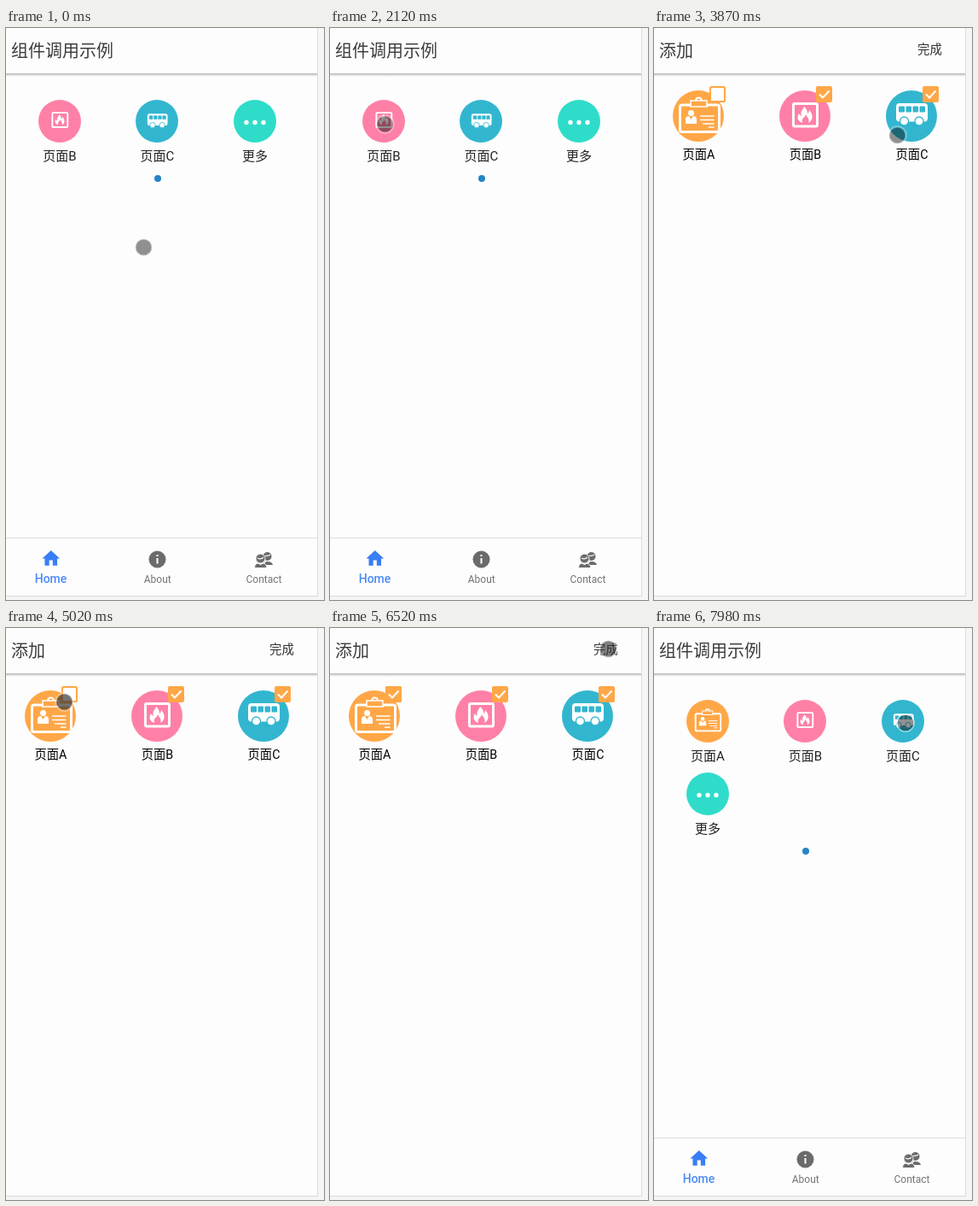
An HTML page for the animation above (8000 ms loop, 373 by 669 pixels).

```html
<!DOCTYPE html>
<html lang="zh-CN">
<head>
<meta charset="utf-8">
<title>组件调用示例</title>
<style>
html, body { margin: 0; width: 100%; height: 100%; overflow: hidden; background: #f5f5f5; }
svg { display: block; width: 373px; height: 669px; }
text { font-family: Roboto, "Noto Sans CJK SC", "Noto Sans CJK", sans-serif; }
.title { font-size: 20px; font-weight: 300; fill: #3c3c3c; }
.done { font-size: 14.4px; fill: #333; }
.label { font-size: 15px; text-anchor: middle; fill: #222; }
.small { font-size: 14.3px; text-anchor: middle; fill: #000; }
.tab { font-size: 12px; text-anchor: middle; fill: #757575; }
.active { font-size: 14px; font-weight: 500; fill: #4a8af8; }

.anim { animation: 8s step-end infinite; }
#before { animation-name: before; }
#after { animation-name: after; }
#add { animation-name: add; }
#tick { animation-name: tick; }
#cursor { animation-name: move; }
#spot { fill: rgba(0, 0, 0, .43); animation-name: press; }

@keyframes before { 0% { visibility: visible } 86.5%, 100% { visibility: hidden } }
@keyframes after { 0% { visibility: hidden } 86.5%, 100% { visibility: visible } }
@keyframes add {
  0% { opacity: 0 }
  46.5% { opacity: .75; transform: translateY(4px) }
  48.375% { opacity: 1; transform: none }
  86.5% { opacity: .7; transform: translateY(6px) }
  88.375%, 100% { opacity: 0; transform: none }
}
@keyframes tick { 0% { visibility: hidden } 66.5%, 100% { visibility: visible } }
@keyframes press {
  0% { fill: rgba(0, 0, 0, .43) }
  62.75% { fill: rgba(50, 50, 50, .68) }
  66.5% { fill: rgba(0, 0, 0, .43) }
  81.5% { fill: rgba(50, 50, 50, .62) }
  88.375%, 100% { fill: rgba(0, 0, 0, .43) }
}
@keyframes move {
  0% { transform: translate(161.5px, 256.5px) }
  5% { transform: translate(159px, 262px) }
  6.5% { transform: translate(156.5px, 266.5px) }
  11.875% { transform: translate(151px, 262px) }
  13.375% { transform: translate(143px, 254px) }
  14.875% { transform: translate(133.5px, 245.5px) }
  16.75% { transform: translate(129.5px, 218.5px) }
  18.625% { transform: translate(119.5px, 191.5px) }
  20.125% { transform: translate(98px, 160px) }
  21.625% { transform: translate(70px, 130px) }
  23.125% { transform: translate(46px, 112px) }
  24.625% { transform: translate(47.5px, 108.5px) }
  26.5% { transform: translate(64.5px, 112.5px) }
  35.125% { transform: translate(216.5px, 140.5px) }
  37% { transform: translate(245px, 139px) }
  38.5% { transform: translate(270px, 132px) }
  40% { transform: translate(285.5px, 125.5px) }
  54.5% { transform: translate(285px, 131px) }
  56% { transform: translate(284.5px, 135px) }
  57.875% { transform: translate(215px, 122px) }
  59.375% { transform: translate(120px, 98px) }
  60.875% { transform: translate(68.5px, 86.5px) }
  69.875% { transform: translate(170px, 73px) }
  71.375% { transform: translate(290.5px, 57.5px) }
  73.25% { transform: translate(318px, 38px) }
  74.75% { transform: translate(338.5px, 24.5px) }
  76.625% { transform: translate(354px, 20px) }
  78.125% { transform: translate(362px, 19px) }
  79.625% { transform: translate(338.5px, 23.5px) }
  81.5% { transform: translate(326.5px, 24.5px) }
  89.875% { transform: translate(322px, 38px) }
  91.375% { transform: translate(316.5px, 52.5px) }
  94.875% { transform: translate(314.5px, 59.5px) }
  96.75% { transform: translate(309px, 78px) }
  98.25% { transform: translate(301px, 98px) }
  99.75%, 100% { transform: translate(295px, 111px) }
}
</style>
</head>
<body>
<svg viewBox="0 0 373 669">
  <defs>
    <linearGradient id="shade" x2="0" y2="1">
      <stop offset="0" stop-color="#b4b4b4"/>
      <stop offset=".4" stop-color="#d6d6d6"/>
      <stop offset="1" stop-color="#fdfdfd"/>
    </linearGradient>

    <g id="bar">
      <rect width="365" height="664" fill="#fdfdfd"/>
      <rect y="53" width="365" height="4" fill="url(#shade)"/>
    </g>

    <!-- Badges have a radius of 30 around their own centre. -->
    <g id="card">
      <circle r="30" fill="#ffa747"/>
      <g fill="none" stroke="#fff">
        <rect x="-21.5" y="-13" width="46" height="31.5" rx="2.5" stroke-width="3"/>
        <path d="M2 0H18.500M2 4.500H18.500M5 9H18.500M12 13H18.500" stroke-width="1.500"/>
        <path d="M-3 -18a3.500 3.500 0 0 1 7 0" stroke-width="2"/>
        <rect x="-9" y="-18" width="19" height="7" fill="#ffa747" stroke-width="1.500"/>
      </g>
      <g fill="#fff">
        <circle cx="-8.500" cy="-3.500" r="3.500"/>
        <path d="M-15 9V4q0-4 4-4l2.500 4 2.500-4q4 0 4 4v5z"/>
      </g>
    </g>

    <g id="fire">
      <circle r="30" fill="#ff80a6"/>
      <rect x="-13.500" y="-14.500" width="28" height="26.500" rx="1.500" fill="none" stroke="#fff" stroke-width="3"/>
      <path d="M-3 8C-8 6-10 2-7-3q1 3 3 3C-6-5-2-8-1-11 2-9 3-6 3-3q2-1 2-4C10-2 10 5 4 8 6 4 3 2 1-2 1 1-5 3-3 8z" fill="#fff"/>
    </g>

    <g id="bus">
      <circle r="30" fill="#32b6cf"/>
      <rect x="-18" y="-15" width="37" height="21.500" rx="4" fill="#fff"/>
      <path d="M-14.500-11h6v6h-6zM-6-11h5.500v6H-6zM2-11h5.500v6H2zM10-11h5.500v6H10z" fill="#32b6cf" stroke="#32b6cf" stroke-linejoin="round"/>
      <g fill="#fff" stroke="#32b6cf" stroke-width="1.300">
        <circle cx="-8.500" cy="6" r="5"/>
        <circle cx="9" cy="6" r="5"/>
      </g>
    </g>

    <g id="more">
      <circle r="25" fill="#2edcc9"/>
      <g fill="#fff">
        <circle cx="-10" cy="1.500" r="2.700"/>
        <circle cy="1.500" r="2.700"/>
        <circle cx="10" cy="1.500" r="2.700"/>
      </g>
    </g>

    <!-- Small badges keep the circle at 25 and shrink the drawing. -->
    <g id="cardS"><circle r="25" fill="#ffa747"/><use href="#card" transform="translate(-.5 -.5) scale(.64)"/></g>
    <g id="fireS"><circle r="25" fill="#ff80a6"/><use href="#fire" transform="translate(0 -.6) scale(.64)"/></g>
    <g id="busS"><circle r="25" fill="#32b6cf"/><use href="#bus" transform="translate(.4 .8) scale(.64)"/></g>

    <g id="checked">
      <rect width="19" height="19" rx="2" fill="#ffa747"/>
      <path d="M4 9.500L8 13.500L15.500 5.500" fill="none" stroke="#fff" stroke-width="2"/>
    </g>

    <g id="home">
      <use href="#bar"/>
      <text class="title" x="6" y="33.500">组件调用示例</text>
      <path d="M0 596.500H365" stroke="#dedede"/>
      <path d="M10 20v-6h4v6h5v-8h3L12 3 2 12h3v8z" transform="translate(40.300 608) scale(1.040)" fill="#387ef5"/>
      <text class="tab active" x="52.500" y="649">Home</text>
      <circle cx="177.500" cy="621.500" r="10" fill="#6b6b6b"/>
      <path d="M176.500 616h2v2h-2zM176.500 620h2v6.500h-2z" fill="#fff"/>
      <text class="tab" x="177.700" y="649">About</text>
      <g fill="#6b6b6b">
        <circle cx="306.500" cy="618" r="5"/>
        <path d="M303 628q0-4 4-4 5 0 6 4z"/>
        <g stroke="#fdfdfd">
          <circle cx="298.500" cy="620.500" r="5.500"/>
          <path d="M291.500 631.500q0-5 4-5.500l3 1.500 3-1.500q4 .5 4.500 5.500z"/>
        </g>
        <path d="M295 620q4 2 7-1M304 617q3 1 6-1" fill="none" stroke="#fdfdfd" stroke-width="1.200"/>
      </g>
      <text class="tab" x="302.500" y="649">Contact</text>
    </g>
  </defs>

  <rect width="373" height="669" fill="#f5f5f5"/>

  <g id="before" class="anim">
    <use href="#home"/>
    <use href="#fireS" x="63" y="109"/>
    <use href="#busS" x="177" y="109"/>
    <use href="#more" x="292" y="109"/>
    <text class="label" x="63" y="154.500">页面B</text>
    <text class="label" x="177.500" y="154.500">页面C</text>
    <text class="label" x="292" y="154.500">更多</text>
    <circle cx="178" cy="176" r="4" fill="#2484c6"/>
  </g>

  <g id="after" class="anim">
    <use href="#home"/>
    <use href="#cardS" x="63" y="109"/>
    <use href="#fireS" x="177" y="109"/>
    <use href="#busS" x="292" y="109"/>
    <use href="#more" x="63" y="194"/>
    <text class="label" x="63" y="154.500">页面A</text>
    <text class="label" x="177.500" y="154.500">页面B</text>
    <text class="label" x="292" y="154.500">页面C</text>
    <text class="label" x="63" y="239.500">更多</text>
    <circle cx="178" cy="261" r="4" fill="#2484c6"/>
  </g>

  <g id="add" class="anim">
    <use href="#bar"/>
    <text class="title" x="6" y="33.500">添加</text>
    <text class="done" x="309" y="29.500">完成</text>
    <use href="#card" x="52" y="103"/>
    <use href="#fire" x="177" y="103"/>
    <use href="#bus" x="302" y="103"/>
    <rect x="66" y="69" width="17" height="17" rx="1" fill="#fff" stroke="#ffa747" stroke-width="2"/>
    <use id="tick" class="anim" href="#checked" x="65" y="68"/>
    <use href="#checked" x="190" y="68"/>
    <use href="#checked" x="315" y="68"/>
    <text class="small" x="52.500" y="153">页面A</text>
    <text class="small" x="177.500" y="153">页面B</text>
    <text class="small" x="302.500" y="153">页面C</text>
  </g>

  <path d="M365.500 0V664.500H0" fill="none" stroke="#dcdcdc"/>

  <g id="cursor" class="anim">
    <circle id="spot" class="anim" r="9.500"/>
    <circle r="10.200" fill="none" stroke="#fff" stroke-opacity=".5" stroke-width="1.400"/>
  </g>
</svg>
</body>
</html>
```
